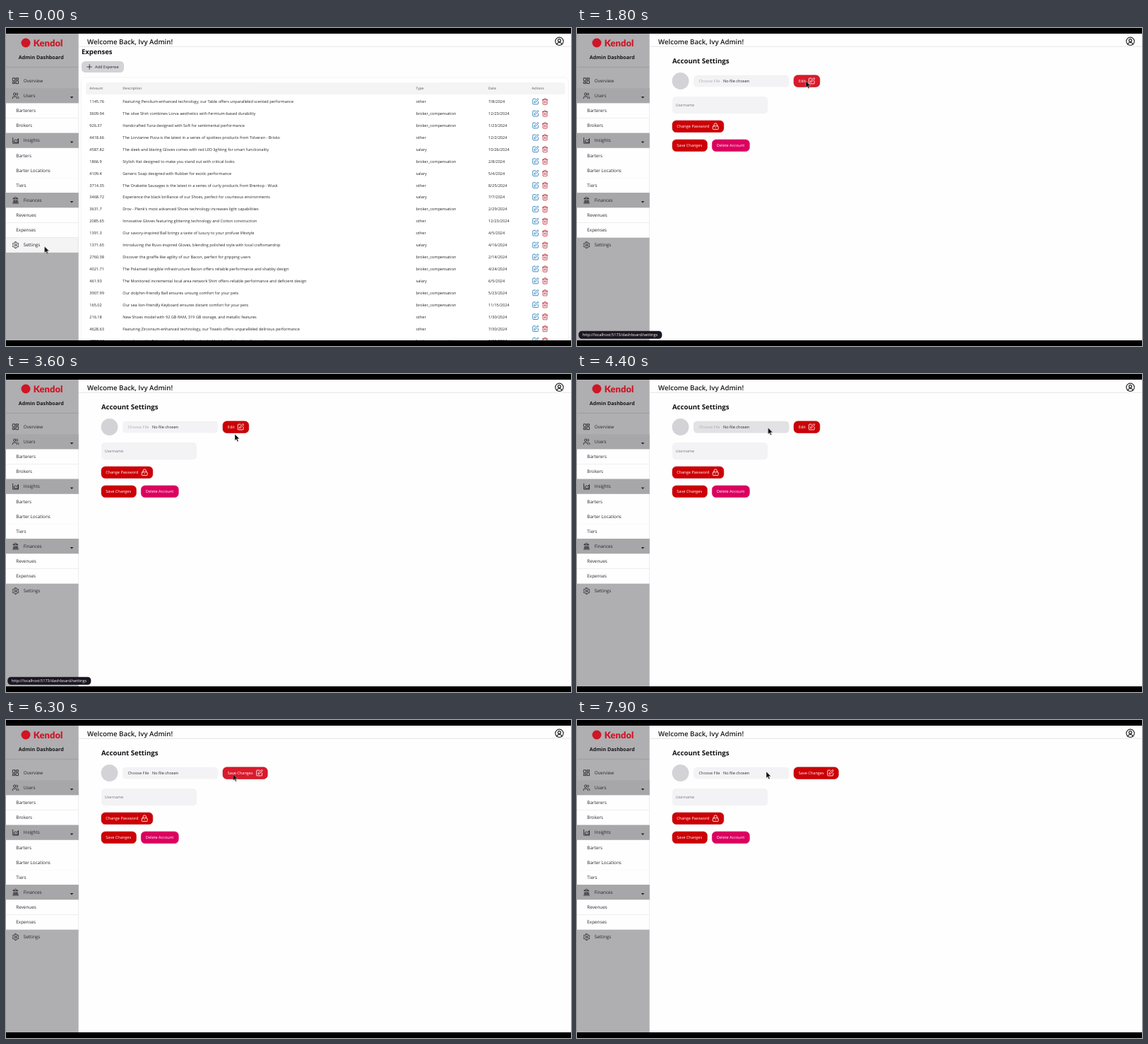
Recreate the animation shown at these times as an HTML page. Size 800 px wide and 450 px high, loop 8 s.

```html
<!DOCTYPE html>
<html lang="en">
<head>
<meta charset="utf-8">
<title>Admin Dashboard</title>
<style>
html, body { margin: 0; width: 100%; height: 100%; overflow: hidden; background: #000; }
svg { display: block; width: 100vw; height: 100vh; }
text { font: 5.58px "Open Sans", "Noto Sans", sans-serif; fill: #26262b; text-rendering: geometricPrecision; white-space: pre; }
.icon { fill: none; stroke: #202024; stroke-width: 2; stroke-linecap: round; stroke-linejoin: round; }
.menu { font-size: 6.35px; }
.h1 { font-size: 9.45px; font-weight: 700; fill: #101014; }
.head { font-size: 4.85px; font-weight: 600; fill: #77777e; }
.on { fill: #fff; }
.btn { fill: #cc0006; stroke: #ae0006; stroke-width: .5; }
.field { fill: #f3f3f5; }

/* 1.25% = 100 ms */
.t { animation: 8s step-end infinite; }
.cursor { animation: move 8s linear infinite; }
.table { animation-name: table; }
.settings { animation-name: settings; }
.row-hover { animation-name: row-hover; }
.status { animation-name: status; }
.narrow { animation-name: narrow; }
.wide { animation-name: wide; }
.hot { animation-name: hot; }
.file { animation-name: file; }
.choose { animation-name: choose; }
@keyframes table { 0% { opacity: 1 } 3.75%, 100% { opacity: 0 } }
@keyframes settings { 0% { opacity: 0 } 3.75%, 100% { opacity: 1 } }
@keyframes row-hover { 0% { opacity: 1 } 7.5%, 100% { opacity: 0 } }
@keyframes status { 0% { opacity: 0 } 17.5% { opacity: 1 } 48.75%, 100% { opacity: 0 } }
@keyframes narrow { 0% { opacity: 1 } 72.5%, 100% { opacity: 0 } }
@keyframes wide { 0% { opacity: 0 } 72.5%, 100% { opacity: 1 } }
@keyframes hot {
  0% { fill: #cc0006 } 21.25% { fill: #d91a2c } 43.75% { fill: #cc0006 }
  65% { fill: #d91a2c } 81.25%, 100% { fill: #cc0006 }
}
@keyframes file {
  0% { fill: #f3f3f5 } 51.25% { fill: #e2e2e5 } 62.5% { fill: #f3f3f5 }
  85% { fill: #e2e2e5 } 95%, 100% { fill: #f3f3f5 }
}
@keyframes choose { 0% { fill: #ababb0 } 72.5%, 100% { fill: #36363a } }
@keyframes move {
  0%, 4% { transform: translate(54.5px, 309px); animation-timing-function: ease-in-out }
  13.75% { transform: translate(234.5px, 272.5px); animation-timing-function: ease-in-out }
  22.5% { transform: translate(324px, 75px) }
  33.75%, 41.25% { transform: translate(327.5px, 73px) }
  45%, 47.5% { transform: translate(324px, 85px); animation-timing-function: ease-in-out }
  55%, 60% { transform: translate(270.5px, 76px); animation-timing-function: ease-in-out }
  66.25% { transform: translate(320px, 76px) }
  78.75%, 80% { transform: translate(321.5px, 76.5px); animation-timing-function: ease-in-out }
  87.5%, 100% { transform: translate(268px, 73px) }
}
</style>
</head>
<body>
<svg viewBox="0 0 800 450" preserveAspectRatio="none">
  <defs>
    <symbol id="pen" viewBox="0 0 24 24"><path d="M12 3H5a2 2 0 0 0-2 2v14a2 2 0 0 0 2 2h14a2 2 0 0 0 2-2v-7M18.4 2.6a2.1 2.1 0 0 1 3 3L12 15l-4 1 1-4Z"/></symbol>
    <symbol id="bin" viewBox="0 0 24 24"><path d="M3 6h18M19 6v14a2 2 0 0 1-2 2H7a2 2 0 0 1-2-2V6M8 6V4a2 2 0 0 1 2-2h4a2 2 0 0 1 2 2v2M10 11v6M14 11v6"/></symbol>
    <symbol id="lock" viewBox="0 0 24 24"><rect x="3" y="11" width="18" height="11" rx="2"/><path d="M7 11V7a5 5 0 0 1 10 0v4M12 16v1"/></symbol>
    <symbol id="grid" viewBox="0 0 24 24"><path d="M3 3h7v9H3ZM14 3h7v5h-7ZM14 12h7v9h-7ZM3 16h7v5H3Z"/></symbol>
    <symbol id="people" viewBox="0 0 24 24"><circle cx="9" cy="7" r="4"/><path d="M2 21v-2a4 4 0 0 1 4-4h6a4 4 0 0 1 4 4v2M16 3.1a4 4 0 0 1 0 7.8M22 21v-2a4 4 0 0 0-3-3.9"/></symbol>
    <symbol id="chart" viewBox="0 0 24 24"><path d="M3 3v18h18V6M7 17v-5l4-3 4 3 5-5v10Z"/></symbol>
    <symbol id="bank" viewBox="0 0 24 24"><path d="M3 22h18M6 18v-7M10 18v-7M14 18v-7M18 18v-7M4 18h16M12 2l8 5H4Z"/></symbol>
    <symbol id="gear" viewBox="0 0 24 24"><path d="M10 2h4l.7 3 2.2 1.3 3-.9 2 3.5-2.3 2.1v2l2.3 2.1-2 3.5-3-.9-2.2 1.3-.7 3h-4l-.7-3-2.2-1.3-3 .9-2-3.5L4.400 13v-2L2.100 8.900l2-3.500 3 .9L9.300 5Z"/><circle cx="12" cy="12" r="3"/></symbol>
    <symbol id="user" viewBox="0 0 24 24"><circle cx="12" cy="12" r="10"/><circle cx="12" cy="10" r="3.500"/><path d="M5.500 19.500a7 7 0 0 1 13 0"/></symbol>
  </defs>

  <rect y="8" width="800" height="434" fill="#fefefe"/>

  <g class="t table">
    <text class="h1" x="107" y="37.300">Expenses</text>
    <rect x="107" y="47" width="60" height="16" rx="5.500" fill="#d3d3d7"/>
    <path class="icon" style="stroke-width:.8" d="M114.900 55h6.600M118.200 51.700v6.600"/>
    <text x="126" y="57">Add Expense</text>
    <rect x="106.500" y="70" width="690" height="390" rx="6" fill="#fff" stroke="#f1f1f3" stroke-width=".8"/>
    <rect x="113" y="77.300" width="678.500" height="16.700" rx="3.500" fill="#f4f4f5"/>
    <g id="rows"></g>
  </g>

  <g class="t settings">
    <text class="h1" style="font-size:9.600px" x="135" y="50.300">Account Settings</text>
    <circle cx="146.500" cy="75" r="11.900" fill="#d3d3d7"/>
    <rect class="field t file" x="165" y="66.700" width="135.300" height="16.900" rx="5"/>
    <text class="t choose" x="172.600" y="77">Choose File</text>
    <text x="207" y="77">No file chosen</text>
    <g class="t narrow">
      <rect class="btn t hot" x="307" y="66.800" width="36.800" height="16.600" rx="5.500"/>
      <text class="on" x="313.800" y="77">Edit</text>
      <use class="icon" style="stroke:#fff" href="#pen" x="327" y="69.800" width="10.400" height="10.400"/>
    </g>
    <g class="t wide">
      <rect class="btn t hot" x="307" y="66.800" width="63.300" height="16.600" rx="5.500"/>
      <text class="on" x="313.800" y="77">Save Changes</text>
      <use class="icon" style="stroke:#fff" href="#pen" x="353.500" y="69.800" width="10.400" height="10.400"/>
    </g>
    <rect class="field" x="135" y="97" width="135" height="24.200" rx="5"/>
    <text x="139.800" y="111" style="fill:#77777e;font-size:5.450px">Username</text>
    <rect class="btn" x="135" y="131" width="72.800" height="16.600" rx="5.500"/>
    <text class="on" x="141.300" y="141.300">Change Password</text>
    <use class="icon" style="stroke:#fff" href="#lock" x="191" y="134" width="10.400" height="10.400"/>
    <rect class="btn" x="135" y="157.900" width="49.400" height="16.600" rx="5.500"/>
    <text class="on" x="141.300" y="168.300">Save Changes</text>
    <rect class="btn" style="fill:#dc005f;stroke:#c00056" x="191.300" y="157.900" width="53" height="16.600" rx="5.500"/>
    <text class="on" x="197.800" y="168.300">Delete Account</text>
  </g>

  <path d="M103 26.200H800" stroke="#e2e2e4" stroke-width=".9"/>
  <text x="115" y="23" style="font-size:9.650px;font-weight:600;fill:#18181c">Welcome Back, Ivy Admin!</text>
  <use class="icon" href="#user" x="776.700" y="12" width="13.600" height="13.600"/>

  <rect y="8" width="102.700" height="434" fill="#afaeb0"/>
  <circle cx="28" cy="21" r="6.500" fill="#cf1526"/>
  <text x="38.800" y="26" style="font:900 13px Lato,sans-serif;fill:#cf1526">Kendol</text>
  <text x="17.800" y="43.800" style="font-size:7.150px;font-weight:700;fill:#18181c">Admin Dashboard</text>
  <path d="M0 55.300H102.700" stroke="#98979a" stroke-width=".7"/>
  <g id="menu"></g>

  <g class="t status">
    <rect x="2.300" y="428.800" width="118" height="11" rx="4.500" fill="#1b1620"/>
    <text class="on" x="7.800" y="436.300">http://localhost:5173/dashboard/settings</text>
  </g>

  <path d="M0 0H800V8H0ZM0 442H800V450H0Z"/>
  <path class="cursor" d="M0 0V9.200L2.100 7.300 3.600 10.700 5.100 10 3.600 6.700H6.500Z" fill="#0a0a0a" stroke="#fff" stroke-width=".4"/>
</svg>
<script>
const text = (x, y, s, cls = '') => `<text class="${cls}" x="${x}" y="${y}">${s}</text>`;
const icon = (id, x, y, size, color = '#202024') =>
  `<use class="icon" style="stroke:${color}" href="#${id}" x="${x}" y="${y - size / 2}" width="${size}" height="${size}"/>`;

// Entries with an icon are main items; "+" marks an open section.
const items = ['Overview|grid', 'Users|people|+', 'Barterers', 'Brokers', 'Insights|chart|+', 'Barters',
  'Barter Locations', 'Tiers', 'Finances|bank|+', 'Revenues', 'Expenses', 'Settings|gear'];
const STEP = 21.13;

document.getElementById('menu').innerHTML = items.map((item, i) => {
  const [label, id, open] = item.split('|');
  const y = 74.7 + i * STEP;
  const bar = (fill, cls = '') =>
    `<rect class="${cls}" y="${y - STEP / 2}" width="102.7" height="${STEP + .1}" fill="${fill}"/>`;
  if (!id) return bar('#fefefe') + text(14.3, y + 2.2, label, 'menu');
  const back = open ? bar('#a7a6a8') : label === 'Settings' ? bar('#f4f4f5', 't row-hover') : '';
  const arrow = open ? `<path d="M90.800 ${y + 1.2}h4.600l-2.300 2.500Z" fill="#202024"/>` : '';
  return back + icon(id, 8.4, y, 10.4) + text(24.8, y + 2.2, label, 'menu') + arrow;
}).join('');

const columns = [118.3, 165.3, 580.5, 683];
const types = { o: 'other', b: 'broker_compensation', s: 'salary' };
const rows = `1145.76|Featuring Perolium-enhanced technology, our Table offers unparalleled scented performance|o|7/8/2024
3609.94|The olive Shirt combines Lorva aesthetics with Fermium-based durability|b|12/23/2024
926.37|Handcrafted Tuna designed with Soft for sentimental performance|b|1/23/2024
4418.66|The Lorvianne Pizza is the latest in a series of spotless products from Tolveran - Brisko|o|12/2/2024
4587.82|The sleek and blaring Gloves comes with red LED lighting for smart functionality|s|10/26/2024
1866.9|Stylish Hat designed to make you stand out with critical looks|b|2/8/2024
4109.4|Generic Soap designed with Rubber for exotic performance|s|5/4/2024
3714.35|The Orabette Sausages is the latest in a series of curly products from Brentop - Wusk|o|8/25/2024
3468.72|Experience the black brilliance of our Shoes, perfect for courteous environments|s|7/7/2024
3631.7|Drov - Plenk's most advanced Shoes technology increases light capabilities|b|2/29/2024
2085.65|Innovative Gloves featuring glittering technology and Cotton construction|o|12/23/2024
1391.3|Our savory-inspired Ball brings a taste of luxury to your profuse lifestyle|o|4/5/2024
1371.65|Introducing the Ruvo-inspired Gloves, blending polished style with local craftsmanship|s|4/16/2024
2760.38|Discover the giraffe-like agility of our Bacon, perfect for gripping users|b|2/14/2024
4021.71|The Polarised tangible infrastructure Bacon offers reliable performance and shabby design|b|4/24/2024
461.93|The Monitored incremental local area network Shirt offers reliable performance and deficient design|s|6/5/2024
3907.99|Our dolphin-friendly Ball ensures unsung comfort for your pets|b|5/23/2024
165.02|Our sea lion-friendly Keyboard ensures distant comfort for your pets|b|11/15/2024
216.18|New Shoes model with 92 GB RAM, 319 GB storage, and metallic features|o|1/30/2024
4628.63|Featuring Zirconium-enhanced technology, our Towels offers unparalleled delirious performance|o|7/30/2024
4850.44|Introducing the Selovia-inspired Car, blending bold style with local craftsmanship|b|3/22/2024`;

const heads = ['Amount', 'Description', 'Type', 'Date', 'Actions'];
document.getElementById('rows').innerHTML =
  heads.map((s, i) => text(columns[i] ?? 744.5, 87.3, s, 'head')).join('') +
  rows.split('\n').map((row, i) => {
    const y = 104.1 + i * 16.92;
    const cells = row.split('|').map((s, c) => text(columns[c], y + 2, types[s] ?? s));
    return cells.join('') + icon('pen', 744.6, y, 10.2, '#1f78b4') + icon('bin', 758.2, y, 10, '#b92b3a');
  }).join('');
</script>
</body>
</html>
```
